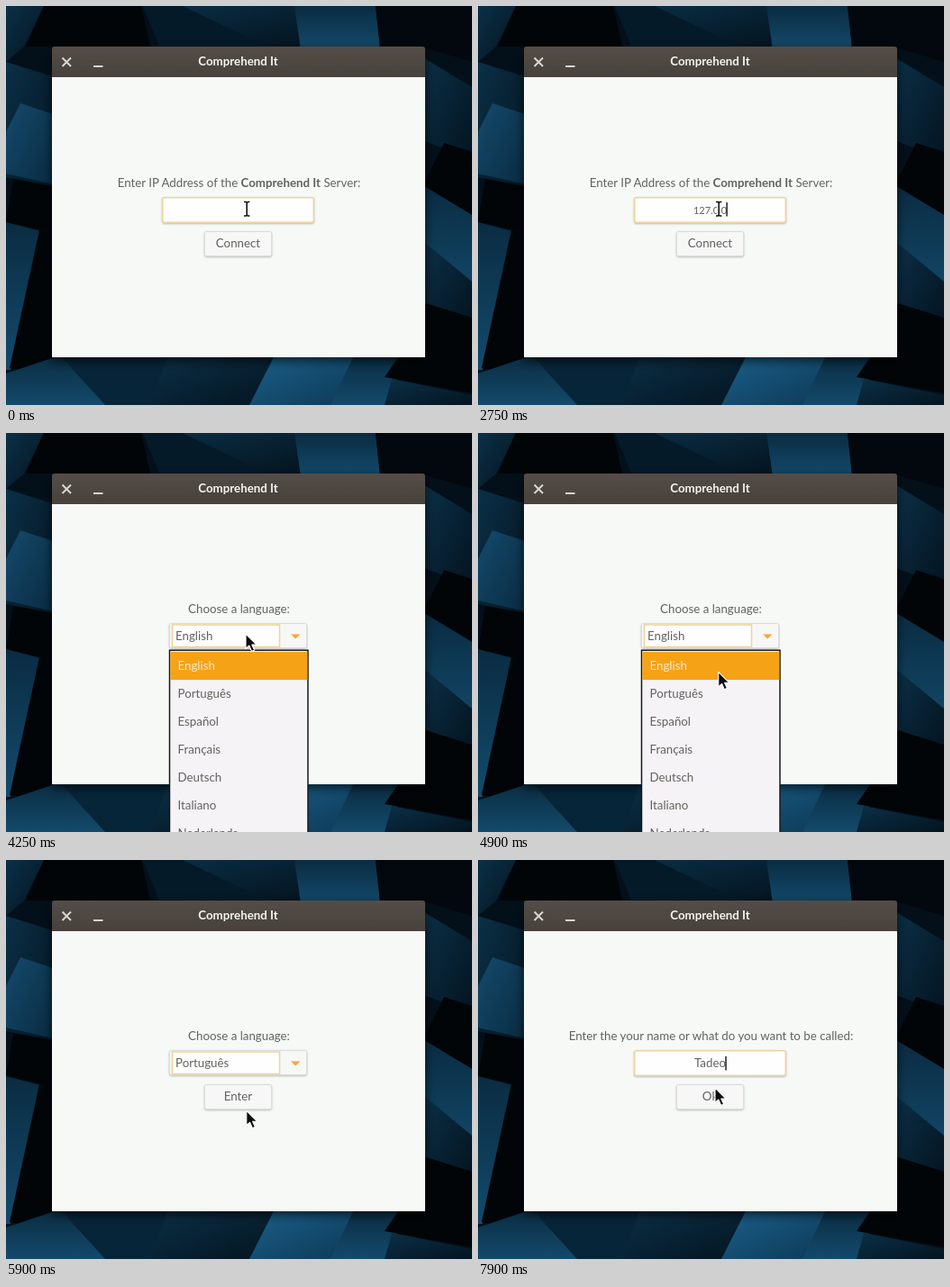
Animation, 517 px wide and 443 px high, one loop 8000 ms. Source, as an HTML page:

```html
<!DOCTYPE html>
<html lang="en">
<head>
<meta charset="utf-8">
<title>Language setup</title>
<style>
  html, body { margin: 0; width: 100%; height: 100%; overflow: hidden; background: #020a11; }
  svg { display: block; width: 517px; height: 443px; }
  text { font: 13.3px Lato, "Open Sans", sans-serif; fill: #62635f; }
  .mid { text-anchor: middle; }
  .bold { font-weight: 700; }
  .title { fill: #f4f3f1; }
  .digits { font-size: 11px; }
  .box { fill: #fefefe; stroke: #efd49a; stroke-width: 1.5; }
  .button { fill: #f6f7f6; stroke: #dcdddb; }
  .lifted { filter: drop-shadow(0 1px 1px rgba(0, 0, 0, .25)); }
  .caret { fill: #222; }
  .item.on text { fill: #fdebcb; }
  .item rect { fill: none; }
  .item.on rect { fill: #f5a216; }
</style>
</head>
<body>
<svg viewBox="0 0 517 443">
  <defs>
    <linearGradient id="deep" x2="1" y2="1">
      <stop stop-color="#0b3047"/><stop offset="1" stop-color="#041420"/>
    </linearGradient>
    <linearGradient id="blue" x2="0" y2="1">
      <stop stop-color="#0a2c42"/><stop offset="1" stop-color="#134a6b"/>
    </linearGradient>
    <linearGradient id="bright" x2="1" y2="1">
      <stop stop-color="#1b5f89"/><stop offset="1" stop-color="#0d3a57"/>
    </linearGradient>
    <linearGradient id="bar" x2="0" y2="1">
      <stop stop-color="#544d47"/><stop offset="1" stop-color="#48413c"/>
    </linearGradient>
    <filter id="shadow" x="-10%" y="-10%" width="120%" height="125%">
      <feDropShadow dx="0" dy="4" stdDeviation="6" flood-opacity=".65"/>
    </filter>
  </defs>

  <g id="wallpaper">
    <path fill="#03101a" d="M0 0H517V443H0Z"/>
    <path fill="url(#deep)" d="M0 0H42L20 45 0 62Z"/>
    <path fill="#010508" d="M42 0H150L160 45H22Z"/>
    <path fill="url(#deep)" d="M152 0H320L330 45H175Z"/>
    <path fill="#041a28" d="M152 0H196L290 45H170Z"/>
    <path fill="url(#blue)" d="M320 0H410L415 48H327Z"/>
    <path fill="#02080d" d="M410 0H517V62L460 45H415Z"/>
    <path fill="url(#deep)" d="M0 62L51 78V200L0 190Z"/>
    <path fill="url(#bright)" opacity=".6" d="M16 108L52 120V198L0 186V140Z"/>
    <path fill="url(#deep)" d="M464 58L517 90V170L464 150Z"/>
    <path fill="#010508" d="M486 152L517 162V238L464 214V196Z"/>
    <path fill="url(#blue)" d="M464 200L517 232V330L464 300Z"/>
    <path fill="url(#deep)" d="M464 262L517 306V352L464 340Z"/>
    <path fill="#010508" d="M8 192L52 200V252L0 240Z"/>
    <path fill="url(#blue)" d="M0 240L38 250 5 404H0Z"/>
    <path fill="#010508" d="M37 249L52 252V394L40 408 4 402Z"/>
    <path fill="url(#blue)" d="M0 408L60 388 172 443H0Z"/>
    <path fill="#072539" d="M60 388H220L180 443H110Z"/>
    <path fill="url(#deep)" d="M180 388H300L280 443H160Z"/>
    <path fill="url(#bright)" d="M298 388H386L378 443H270Z"/>
    <path fill="url(#blue)" d="M386 388H440L426 443H360Z"/>
    <path fill="#010508" d="M442 380L466 330 517 346V430L420 412Z"/>
    <path fill="url(#deep)" d="M428 414L517 432V443H420Z"/>
  </g>

  <g filter="url(#shadow)">
    <path fill="#f7f9f7" d="M51 78H465V390H51Z"/>
    <path fill="url(#bar)" d="M51 79V48Q51 45 54 45H462Q465 45 465 48V79Z"/>
  </g>
  <path fill="none" stroke="#d9d6d1" stroke-width="2" d="M62.5 57.5L72 67M72 57.5L62.5 67M97 67H107.5"/>
  <text class="mid bold title" x="257.5" y="66">Comprehend It</text>

  <g id="server">
    <text class="mid" x="258.5" y="201">Enter IP Address of the <tspan class="bold">Comprehend It</tspan> Server:</text>
    <rect class="box lifted" x="173.8" y="212.8" width="167.5" height="27.5" rx="2"/>
    <text id="address" class="mid digits" x="257.5" y="230.5"></text>
    <rect class="button lifted" x="220.5" y="250.5" width="74" height="27" rx="2"/>
    <text class="mid" x="257.5" y="268">Connect</text>
  </g>

  <g id="language">
    <text class="mid" x="258.5" y="200">Choose a language:</text>
    <rect class="button lifted" x="181.5" y="211.5" width="152" height="27" rx="2"/>
    <rect class="box" x="184.5" y="213" width="119" height="24.5"/>
    <text id="choice" x="188" y="229.5"></text>
    <path fill="#f4a733" d="M316 223.5H326.5L321.2 228.5Z"/>
    <rect class="button lifted" x="220.5" y="249.5" width="74" height="27" rx="2"/>
    <text class="mid" x="257.5" y="267">Enter</text>
    <g id="popup">
      <rect x="181.5" y="241.2" width="153.5" height="220" fill="#f5f3f5" stroke="#15181a" stroke-width="1.5"/>
    </g>
  </g>

  <g id="person">
    <text class="mid" x="258.5" y="200">Enter the your name or what do you want to be called:</text>
    <rect class="box lifted" x="173.8" y="211.8" width="167.5" height="27.5" rx="2"/>
    <text id="nickname" class="mid" x="257.5" y="229.5"></text>
    <rect class="button lifted" x="220.5" y="249.5" width="74" height="27" rx="2"/>
    <text class="mid" x="257.5" y="267">Ok</text>
  </g>

  <rect id="caret" class="caret" y="218" width="1.5" height="15.5"/>
  <g id="beam" fill="none" stroke-linecap="square">
    <path id="beamShape" stroke="#fff" stroke-width="3.6" d="M264.8 217.5H266.2L267.2 218.5 268.2 217.5H269.6M267.2 218.5V232M264.8 233H266.2L267.2 232 268.2 233H269.6"/>
    <use href="#beamShape"/>
    <path stroke="#111" stroke-width="1.6" d="M264.8 217.5H266.2L267.2 218.5 268.2 217.5H269.6M267.2 218.5V232M264.8 233H266.2L267.2 232 268.2 233H269.6"/>
  </g>
  <path id="arrow" fill="#0b0b0b" stroke="#fff" stroke-width="1.1" stroke-linejoin="round"
        d="M0 0V16.5L3.8 13 6.6 19.4 9.6 18 6.8 12H12Z"/>
</svg>
<script>
const LOOP = 8000;
const LANGUAGES = ["English", "Português", "Español", "Français", "Deutsch", "Italiano", "Nederlands"];
const ADDRESS = "127.0.0.1", ADDRESS_KEYS = [1450, 1650, 1850, 2200, 2400, 2550, 2700, 2850, 3050];
const NICKNAME = "Tadeo", NICKNAME_KEYS = [7450, 7700, 7800, 7800, 7900];
const ASK_LANGUAGE = 3300, OPEN = 4150, PICK = 5500, ASK_NAME = 6250;
const PATH = [[4400, 266, 223], [5150, 267, 280], [5850, 267, 280], [6100, 265, 264], [6350, 265, 264], [7000, 263, 253]];

const $ = id => document.getElementById(id);
const show = (id, on) => { $(id).style.display = on ? "" : "none"; };
const within = (t, from, to) => t >= from && t < to;
const typed = (word, keys, t) => word.slice(0, keys.filter(k => k <= t).length);

function make(parent, tag, attrs) {
  const el = document.createElementNS("http://www.w3.org/2000/svg", tag);
  for (const name in attrs) el.setAttribute(name, attrs[name]);
  return parent.appendChild(el);
}

const items = LANGUAGES.map((name, i) => {
  const item = make($("popup"), "g", { class: "item", transform: `translate(0 ${243 + 31 * i})` });
  make(item, "rect", { x: 182.3, width: 152, height: 31 });
  make(item, "text", { x: 190.5, y: 19.5 }).textContent = name;
  return item;
});

function pointer(t) {
  const next = PATH.findIndex(p => p[0] > t);
  if (next === 0) return PATH[0].slice(1);
  if (next < 0) return PATH[PATH.length - 1].slice(1);
  const [t0, x0, y0] = PATH[next - 1], [t1, x1, y1] = PATH[next];
  const u = (t - t0) / (t1 - t0), e = u * u * (3 - 2 * u);
  return [x0 + (x1 - x0) * e, y0 + (y1 - y0) * e];
}

function caretOn(t) {
  if (t < ASK_LANGUAGE) return within(t, 200, 700) || t >= 1200;
  return within(t, ASK_NAME, 6400) || within(t, 6900, 7400) || t >= 7450;
}

function draw(t) {
  const first = t < ASK_LANGUAGE, last = t >= ASK_NAME;
  show("server", first);
  show("language", !first && !last);
  show("person", last);
  show("popup", within(t, OPEN, PICK));
  show("beam", first);
  show("arrow", !first);
  show("caret", caretOn(t));

  $("address").textContent = typed(ADDRESS, ADDRESS_KEYS, t);
  $("nickname").textContent = typed(NICKNAME, NICKNAME_KEYS, t);
  $("choice").textContent = LANGUAGES[t < PICK ? 0 : 1];

  const field = first ? $("address") : $("nickname");
  const width = field.textContent && (first || last) ? field.getComputedTextLength() : 0;
  $("caret").setAttribute("x", 256.8 + width / 2);

  const [x, y] = pointer(t);
  $("arrow").setAttribute("transform", `translate(${x} ${y})`);
  items.forEach((item, i) => item.classList.toggle("on", i === (y > 274 ? 1 : 0)));
}

const start = performance.now();
(function tick() {
  draw((performance.now() - start) % LOOP);
  requestAnimationFrame(tick);
})();
</script>
</body>
</html>
```
